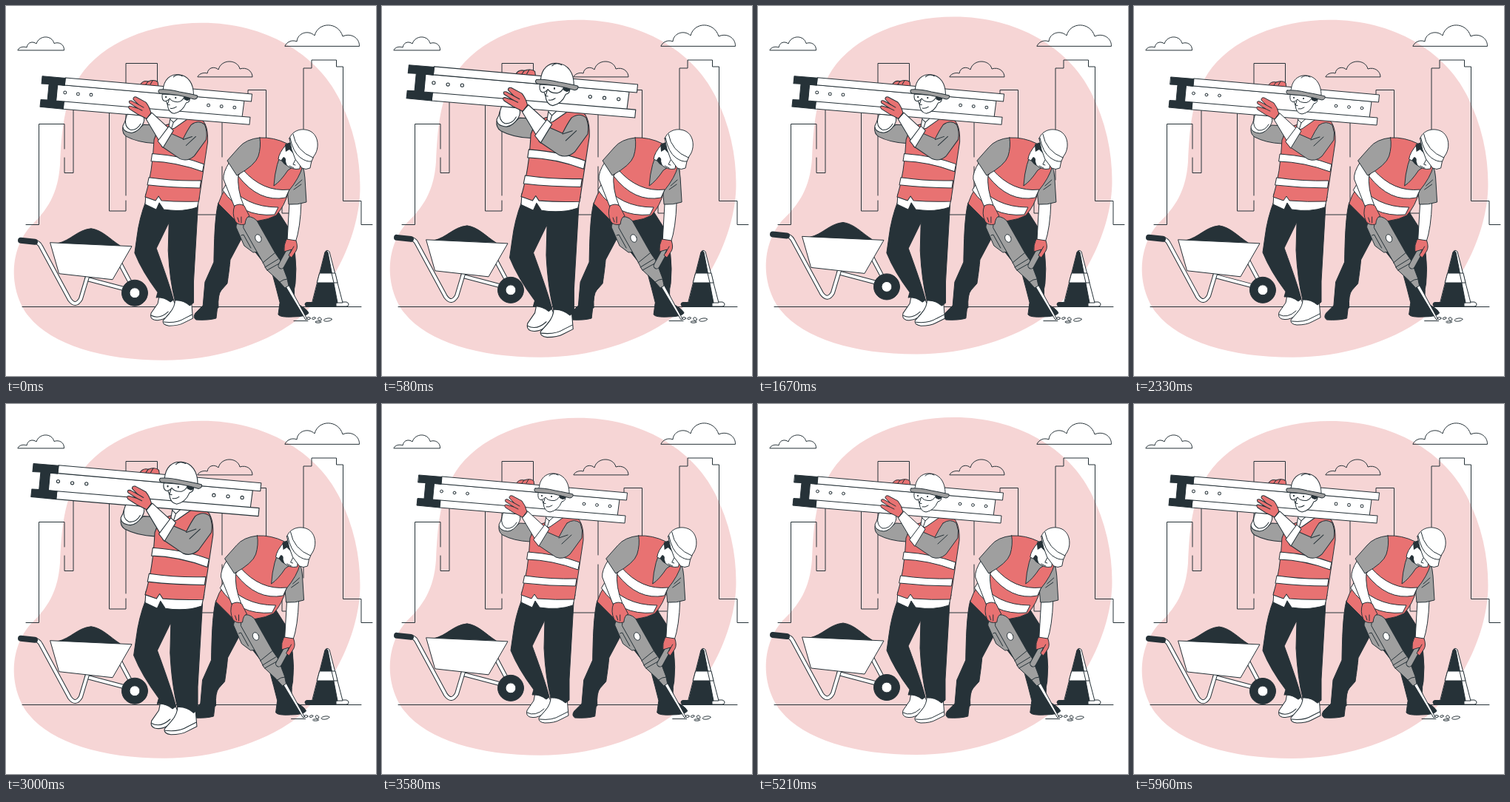
Recreate the animation shown at these times as an HTML page with a canvas. Size 500 by 500 pixels, loop 6000 ms.

```html
<!DOCTYPE html>
<html lang="en">
<head>
<meta charset="utf-8">
<title>Construction workers</title>
<style>
html, body { margin: 0; width: 100%; height: 100%; overflow: hidden; background: #fff; }
canvas { display: block; width: 500px; height: 500px; }
</style>
</head>
<body>
<canvas id="stage"></canvas>
<script>
const canvas = document.getElementById('stage');
const ctx = canvas.getContext('2d');
const dpr = window.devicePixelRatio || 1;
canvas.width = canvas.height = 500 * dpr;

const INK = '#263238', RED = '#e87272', PINK = '#f6d5d5', GREY = '#9f9f9f', WHITE = '#fff';
const LOOP = 6000, LEAD = 40;
const cache = {};

const path = d => cache[d] || (cache[d] = new Path2D(d));

function fill(d, color) {
  ctx.fillStyle = color;
  ctx.fill(path(d));
}

function line(d, width = 1, color = INK) {
  ctx.lineWidth = width;
  ctx.strokeStyle = color;
  ctx.stroke(path(d));
}

function shape(d, color) {
  fill(d, color);
  line(d);
}

function tube(d, outer = 6, inner = 4, color = WHITE) {
  line(d, outer);
  line(d, inner, color);
}

function oval(x, y, rx, ry, color, angle = 0) {
  ctx.beginPath();
  ctx.ellipse(x, y, rx, ry, angle, 0, Math.PI * 2);
  ctx.fillStyle = color;
  ctx.fill();
  ctx.lineWidth = 1;
  ctx.strokeStyle = INK;
  ctx.stroke();
}

// Linear interpolation through [position, value] keys
function track(keys, p) {
  for (let i = 1; i < keys.length; i++) {
    const [a, from] = keys[i - 1], [b, to] = keys[i];
    if (p <= b) return from + (to - from) * (p - a) / (b - a);
  }
  return keys[keys.length - 1][1];
}

const FLOAT = [[0, 0], [.5, -10], [1, 0]];
const BEAT = [[0, 1], [.1, 1.1], [.3, 1], [.4, 1], [.5, 1.1], [.6, 1], [1, 1]];
const SHAKE = [0, -1, 2, -4, 4, -4, 4, -4, 2, -1, 0].map((x, i) => [i / 10, x]);

function blob() {
  fill('M265 23C350 23 420 65 450 125C470 165 478.500 205 478.500 245C478.500 310 441 386 390 427C345 459 280 479 214 479C130 479 62 458 31 420C8 392 0 338 32 299C56 276 70 255 73 215C75 170 78 130 100 95C130 50 195 23 265 23Z', PINK);
}

function city() {
  line('M27 295.5H44.5V159.5H79V193M79 205V225.5H91V120');
  line('M139.5 125V277H162V263M162 256V77.5H204.5V108');
  line('M292 140V204M292 217V282H250M327 122V113.5H351.5V200M373 250V280H385');
  line('M402 235V84H413V73H446.5V82H455.5V263.5H480V295.5H495');
  line('M16 59.5C18 55 24 54.500 28 56C29 49 36 47 41 51C45 39 62 39 65 50.500C72 48 79 52 78.5 59.5Z');
  line('M377 54C379 49 386 45 393 48C394 36 409 32 417 40C422 21 449 21 455 41C466 36 478 43 477.5 54Z');
  line('M259 95.5C261 91 268 89.500 272 91C273 83 282 81 287 86C291 71 313 72 316 85C325 82 333 88 333 95.5Z');
  line('M22 406.5H480');
}

function barrow() {
  tube('M152 344L169 376');
  tube('M109 369L162 383');
  tube('M38 319Q44 319 47 325L86 397Q94 408 101 396L110 366');
  line('M20 317L39 319', 8);
  shape('M70 321C88 317 96 303 115 301C130 303 140 315 154 324Z', INK);
  shape('M60 320L170 325L144 370L72 362Z', WHITE);
  oval(174, 388, 17.5, 17.5, INK);
  oval(174, 388, 7, 7, WHITE);
}

function cone() {
  shape('M440 400H460Q463 401 463 403Q463 406 460 406H440Z', WHITE);
  shape('M431 333Q433.500 328 437 332L455 401H430Z', WHITE);
  shape('M431 333Q433 329 435 333L448 401H414Z', INK);
  shape('M424 361H445L448 374H420.5Z', WHITE);
  line('M440 361L443 374');
  shape('M407 400.5H446V406H407Q404 406 404 403Q404 400.5 407 400.5Z', INK);
}

function driller() {
  // Legs and boots
  shape('M287 266C282 285 281.500 320 281 346L269 373L266 408H287Q286 390 291 384L299 375Q302 355 303 343L320 311L360 362Q365 380 371 404L393 403Q387 390 391 375Q395 335 382 300L368 278Z', INK);
  shape('M266 405L256 415Q252 421 257 424Q274 425 284 422L286 405Z', INK);
  shape('M370 402L368 417Q371 421 388 420Q405 420 409 415Q408 410 393 402Z', INK);

  // Far arm
  shape('M383 266L380 318L391 320Q398 300 399 265Z', WHITE);
  shape('M399 214Q404 222 404 232L406 265Q394 269 382 268L380 245Z', GREY);
  line('M400 235L391 243M399 241L389 248');

  // Vest
  shape('M343 178Q362 177 380 186L401 216Q397 232 382 250Q377 270 365 283Q345 294 310 290L287 267Q294 244 316 226Z', RED);
  shape('M320 221Q347 252 383 248L378 259Q342 266 314 230Z', WHITE);
  shape('M299 239Q322 272 368 272L363 282Q318 286 293 249Z', WHITE);
  shape('M376 191Q364 212 362 243Q371 237 381 222L392 215Z', GREY);

  // Head and helmet
  shape('M379 187Q369 198 368 207Q375 209 379 215Q387 222 397 220L399 204L388 184Z', WHITE);
  fill('M377 187L387 183Q386 193 389 200L383 194L378 197Z', INK);
  fill('M375 204Q379 205 378 210L380 216Q374 213 372 208Z', INK);
  line('M391 208L388 214L391 215M383 216L389 219');
  shape('M383 179C387 168 400 164 411 169C423 175 424 193 416 203Q412 210 411 219Q405 222 400 219L391 207Q385 194 383 179Z', WHITE);
  line('M384 178Q388 198 398 205Q406 211 413 210M388 173Q392 196 415 205');

  // Near arm
  shape('M302 211Q293 225 294 234L309 272L321 269Q312 248 314 226Z', WHITE);
  shape('M343 178Q324 180 315 191L299 209L312 229Q337 215 341 203Q345 190 343 178Z', GREY);

  // Drill
  shape('M378 379L405 424L407 423L382 377Z', WHITE);
  shape('M315 292Q311 294 311 299L322 324L334 333L344 332L322 295Z', GREY);
  shape('M322 286Q331 282 339 290L364 334L371 344L380 368L382 378L377 381L369 372L352 356L347 346L321 300Z', GREY);
  line('M318 310L321 309L331 327M347 347L363 334M350 353L368 342M353 357L371 347M370 373Q375 369 380 369');
  oval(341, 314, 4, 5.5, WHITE, -.4);
  tube('M372 351L383 331', 9, 7, GREY);

  // Gloves
  shape('M309 270Q316 266 322 270L329 284Q324 285 323 295Q314 297 310 291Q305 280 309 270Z', RED);
  line('M313 286L315 292M318 285L318 293');
  shape('M379 315L392 317Q395 326 392 331L386 340L382 337L386 329L376 332Q375 323 379 315Z', RED);
  line('M389 325L384 334');

  // Rubble
  line('M389 425.500H408');
  oval(409, 422, 2.5, 1.5, WHITE);
  oval(416, 422, 2.5, 1.3, WHITE, -.3);
  oval(424, 423, 2.5, 2, WHITE, .6);
  oval(422, 427, 4, 1.2, WHITE);
  oval(435, 424, 5.500, 2, WHITE, -.15);
}

function beam() {
  shape('M70 107L321 129L318 152L68 130Z', WHITE);
  shape('M81 98L331.500 120L330.500 130L80 108Z', WHITE);
  shape('M79 130L329 151L328 161L78 140Z', WHITE);
  shape('M50 96L81 98.500L80 108.500L70.500 107.500L68.500 129L79 130L78 140L47 137L48 127.500L57 128L59 106.500L49 106Z', INK);
  [[80.5, 118], [98, 120], [115.5, 121], [273, 135], [290.5, 136.5], [308, 138]]
    .forEach(([x, y]) => oval(x, y, 1.9, 1.9, WHITE));
}

function carrier() {
  shape('M181 108Q185 101 192 103Q201 100 205 104L206 111Z', RED);
  line('M192 103L189 107M198 102L195 107');

  // Raised arm behind the vest
  shape('M158 165Q157 173 163 177Q178 185 200 186L205 162L186 161L174 171Z', GREY);

  // Shoes and trousers
  shape('M207 391L205 401L196 414Q194 421 200 423Q208 425 216 420L229 404L225 394Z', WHITE);
  line('M196 417Q207 423 219 412');
  shape('M228 395Q229 405 220 415L212 424Q211 430 220 431Q233 431 240 427L252 421L250 396Z', WHITE);
  line('M213 426Q230 428 241 421L251 416');
  shape('M189 264Q180 287 177 312L174 333Q184 358 205 386L203 393Q213 392 222 399L226 396Q222 379 203 327L220 292L219 330Q221 370 228 397Q239 396 248 404L253 400L253 372Q256 320 259 268Z', INK);

  // Shirt hem and vest
  shape('M189 254L188 268L203 275L207 266L213 275Q238 279 258 272L261 258Z', WHITE);
  shape('M222 160Q207 162 200 181Q198 225 188 258L202 263L206 257L210 263Q234 265 260 264Q266 224 272 184Q273 155 258 151L244 150Z', RED);
  shape('M197.5 200Q238 203 267 214L265 224Q230 211 196 210Z', WHITE);
  shape('M193 232Q228 237 263 236L261.500 246Q226 246 191 242Z', WHITE);

  // Neck and collar
  shape('M223 146L219 168L227 166L247 152L241 134Z', WHITE);
  line('M222 154L226 158L240 145L247 152M226 158L223 167');

  beam();

  // Head
  shape('M212 119L218 134Q219 145 227 146Q238 144 243 132Q249 131 248 123L240 117Z', WHITE);
  fill('M240 122H249Q249 129 244 129L240 127Z', INK);
  shape('M211 120Q210 128 214 129.500Q218 130 221 126Q224 131 233 130.500Q239 129 241 122Z', WHITE);
  oval(216, 124, .5, .8, INK);
  oval(229, 125, .5, .8, INK);
  line('M220 128L218 134L221 134.500M222 139Q226 140 230 137');
  shape('M212 115C213 100 222 93 233 94C246 95 253 106 253 121Q233 122 212 115Z', WHITE);
  line('M226 97Q231 92 238 96');
  shape('M207 114Q204 117 208 119Q232 120 254 127Q259 126 258 122Q251 120 234 117Q218 113 207 114Z', GREY);

  // Raised forearm
  shape('M164 147L185 149Q189 154 184 162Q178 171 170 172Q158 171 158 163Q161 158 162 153Z', WHITE);
  line('M162 153Q160 164 168 168Q177 169 182 160');

  // Front arm
  shape('M189 153L207 183L221 167L197 145Z', WHITE);
  shape('M250 161Q260 154 268 161Q272 171 270 181L254 203Q245 211 235 207L210 190L223 173L239 180Q245 168 250 161Z', GREY);
  shape('M205 183L220 163L226 169L212 192Z', WHITE);
  line('M239 181L251 177M243 189L256 177');
  shape('M190 153L178 147L167 140Q164 136 168 136L178 139L167 132Q165 128 170 129L179 134L172 127Q172 123 176 124L189 131Q194 137 196 146Z', RED);
  line('M178 139L184 142M179 134L186 138M190 153L196 145');
}

function draw(ms) {
  const t = (ms + LEAD) % LOOP;
  const p = t / LOOP;
  const lift = track(FLOAT, t % 3000 / 3000);
  const beat = track(BEAT, p);

  ctx.setTransform(dpr, 0, 0, dpr, 0, 0);
  ctx.lineCap = ctx.lineJoin = 'round';
  ctx.fillStyle = WHITE;
  ctx.fillRect(0, 0, 500, 500);

  const moved = (x, y, scale, part) => {
    ctx.save();
    ctx.translate(x, y);
    ctx.scale(scale, scale);
    part();
    ctx.restore();
  };

  moved(0, lift, 1, blob);
  city();
  cone();
  moved(0, lift, 1, barrow);
  moved(track(SHAKE, p), 0, 1, driller);
  // Pulse around the centre of the carrier's box
  moved(188.5 * (1 - beat), 262 * (1 - beat), beat, carrier);
}

function frame() {
  draw(performance.now());
  requestAnimationFrame(frame);
}
frame();
</script>
</body>
</html>
```
